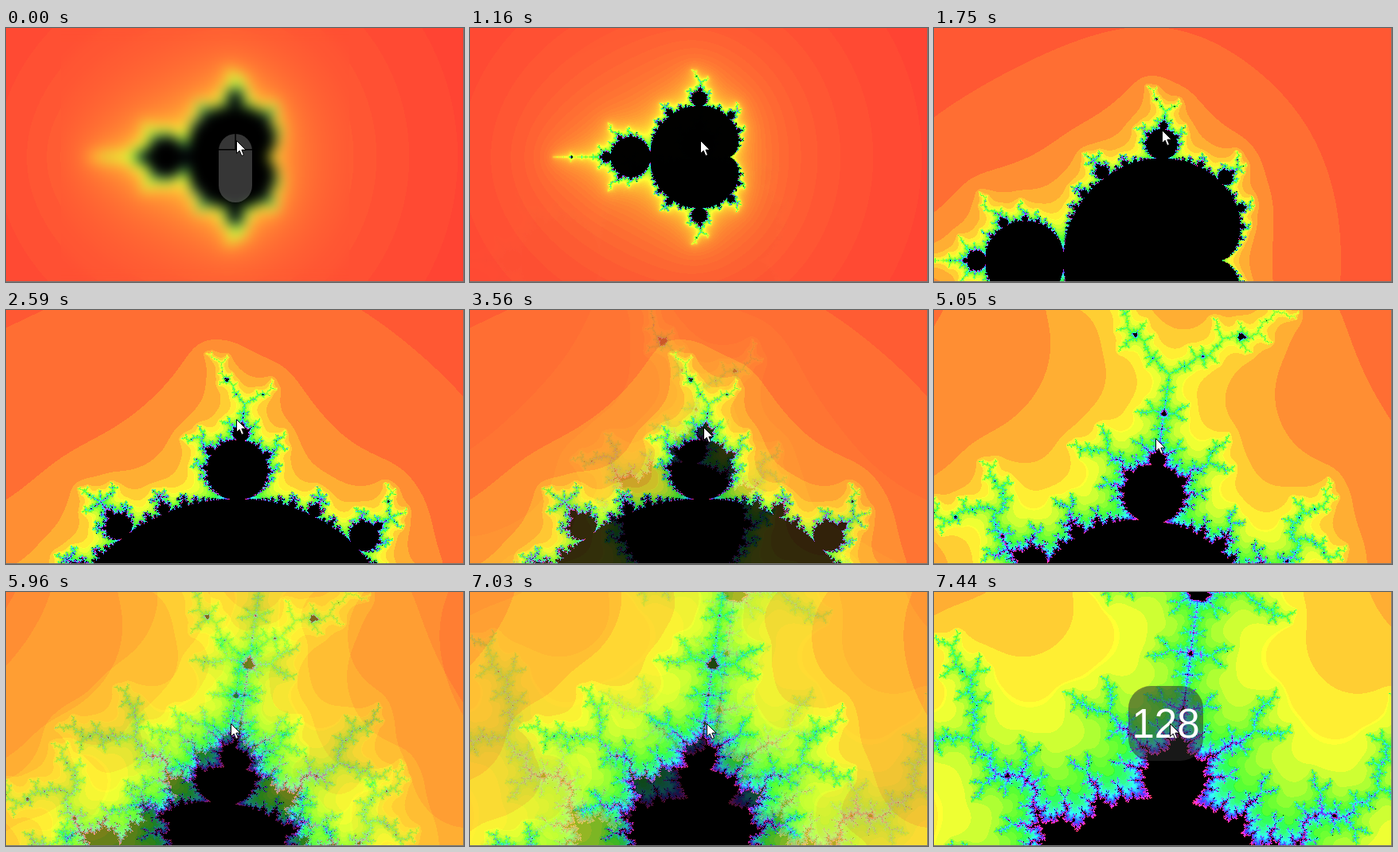
An HTML page with a canvas that plays this animation: 575x319 px, repeating every 8 s.

```html
<!DOCTYPE html>
<html lang="en">
<head>
<meta charset="utf-8">
<title>Fractal zoom</title>
<style>
  html, body { margin: 0; width: 100%; height: 100%; overflow: hidden; background: #ff4533; }
  canvas { display: block; }
</style>
</head>
<body>
<canvas id="stage" width="575" height="319"></canvas>
<script>
const W = 575, H = 319, LOOP = 8000, FADE = 360, UNIT = 98.1;
const ctx = document.getElementById('stage').getContext('2d');

// Each step: popup appears, popup gives way to the next level,
// cursor position meanwhile, fixed point of the doubling that follows.
const steps = [
  { show: 910, fade: 1160, cursor: [289, 141], focus: [289, 31.5] },
  { show: 1930, fade: 2170, cursor: [285, 126], focus: [281, 90.5] },
  { show: 3010, fade: 3490, cursor: [293, 147], focus: [312, 135] },
  { show: 4400, fade: 4690, cursor: [274, 150], focus: [278.5, 119] },
  { show: 5230, fade: 5780, cursor: [279, 165], focus: [272, 169] },
  { show: 6550, fade: 6930, cursor: [297, 165], focus: [276, 181] },
  { show: 7440, fade: LOOP, cursor: [296, 165] },
];

const clamp = v => Math.max(0, Math.min(1, v));
const smooth = u => u * u * (3 - 2 * u);
const mix = (a, b, u) => a + (b - a) * u;

// Colour bands: narrow in the opening view, wide afterwards.
const fine = v => Math.floor((v - 5) / 6) * 6 + 8;
const coarse = v => Math.max(88, Math.floor(v / 32) * 32 + 14);

function channel(n, hue, band) {
  const k = (n + hue / 30) % 12;
  const v = 255 * (0.6 - 0.4 * Math.max(-1, Math.min(k - 3, 9 - k, 1)));
  return v > 253 ? 255 : v < 54 ? 51 : band(v);
}

// Smooth escape count, or -1 inside the set.
function escape(a, b, limit) {
  let x = a, y = b;
  for (let n = 0; n < limit; n++) {
    const xx = x * x, yy = y * y;
    if (xx + yy > 2500) return n - Math.log2(Math.log(xx + yy) / 2);
    y = 2 * x * y + b;
    x = xx - yy + a;
  }
  return -1;
}

function render(level, [ox, oy]) {
  const canvas = document.createElement('canvas');
  canvas.width = W;
  canvas.height = H;
  const c = canvas.getContext('2d'), img = c.createImageData(W, H), d = img.data;
  const scale = UNIT * 2 ** level, limit = 60 + 6.6 * level;
  const band = level ? coarse : fine;
  for (let y = 0, i = 0; y < H; y++) {
    for (let x = 0; x < W; x++, i += 4) {
      const nu = escape((x - ox) / scale, (oy - y) / scale, limit);
      if (nu > -1) {
        const hue = 360 * (nu + 1.2) / limit;
        d[i] = channel(0, hue, band);
        d[i + 1] = channel(8, hue, band);
        d[i + 2] = channel(4, hue, band);
      }
      d[i + 3] = 255;
    }
  }
  c.putImageData(img, 0, 0);
  return canvas;
}

// The stage position of zero moves away from each focus as the scale doubles.
let origin = [299.5, 161.5];
const levels = steps.map(({ focus }, level) => {
  const canvas = render(level, origin);
  if (focus) origin = origin.map((v, i) => 2 * v - focus[i]);
  return canvas;
});

const arrow = new Path2D('M0 0V16L3.7 12.6L6.3 19L9 17.9L6.4 11.6H11.6Z');

function drawIntro(amount) {
  ctx.save();
  ctx.beginPath();
  ctx.rect(69, 0, 362, H);
  ctx.clip();
  ctx.filter = `blur(${8 * amount}px)`;
  ctx.drawImage(levels[0], 0, 0);
  ctx.filter = 'none';
  ctx.globalAlpha = amount;
  ctx.fillStyle = 'rgba(255,255,255,.21)';
  ctx.beginPath();
  ctx.roundRect(267, 133, 42, 86, 21);
  ctx.fill();
  ctx.fillStyle = '#000';
  ctx.fillRect(267, 152, 42, 1.5);
  ctx.fillRect(287.3, 133, 1.5, 19);
  ctx.restore();
}

function drawPopup(label) {
  ctx.fillStyle = 'rgba(44,44,44,.55)';
  ctx.beginPath();
  ctx.roundRect(244, 118, 94, 94, 28);
  ctx.fill();
  const size = label > 99 ? 51 : 70;
  ctx.font = size + 'px "Liberation Sans", Arial, sans-serif';
  ctx.textAlign = 'center';
  ctx.fillStyle = '#fff';
  ctx.fillText(label, 291, 165 + size * 0.36);
}

function drawCursor(x, y) {
  ctx.save();
  ctx.translate(Math.round(x) + 0.5, Math.round(y) + 0.5);
  ctx.fillStyle = '#fff';
  ctx.strokeStyle = '#000';
  ctx.lineWidth = 1;
  ctx.fill(arrow);
  ctx.stroke(arrow);
  ctx.restore();
}

function draw(t) {
  const level = steps.filter(s => s.fade <= t).length;
  const step = steps[level], last = steps[Math.max(0, level - 1)];

  ctx.drawImage(levels[Math.max(0, level - 1)], 0, 0);
  if (level) {
    ctx.globalAlpha = clamp((t - last.fade) / FADE);
    ctx.drawImage(levels[level], 0, 0);
    ctx.globalAlpha = 1;
  }

  // The opening view comes into focus while the mouse hint fades.
  const intro = 1 - clamp((t - 290) / 440);
  if (intro > 0) drawIntro(intro);

  if (t >= step.show) drawPopup(2 ** (level + 1));

  const u = level ? smooth(clamp((t - last.fade) / (step.show - last.fade))) : 1;
  drawCursor(...step.cursor.map((v, i) => mix(last.cursor[i], v, u)));

  ctx.fillStyle = '#777';
  ctx.fillRect(0, H - 1, W, 1);
  ctx.fillRect(W - 1, 0, 1, H);
}

const start = performance.now();
function tick() {
  draw((performance.now() - start) % LOOP);
  requestAnimationFrame(tick);
}
tick();
</script>
</body>
</html>
```
